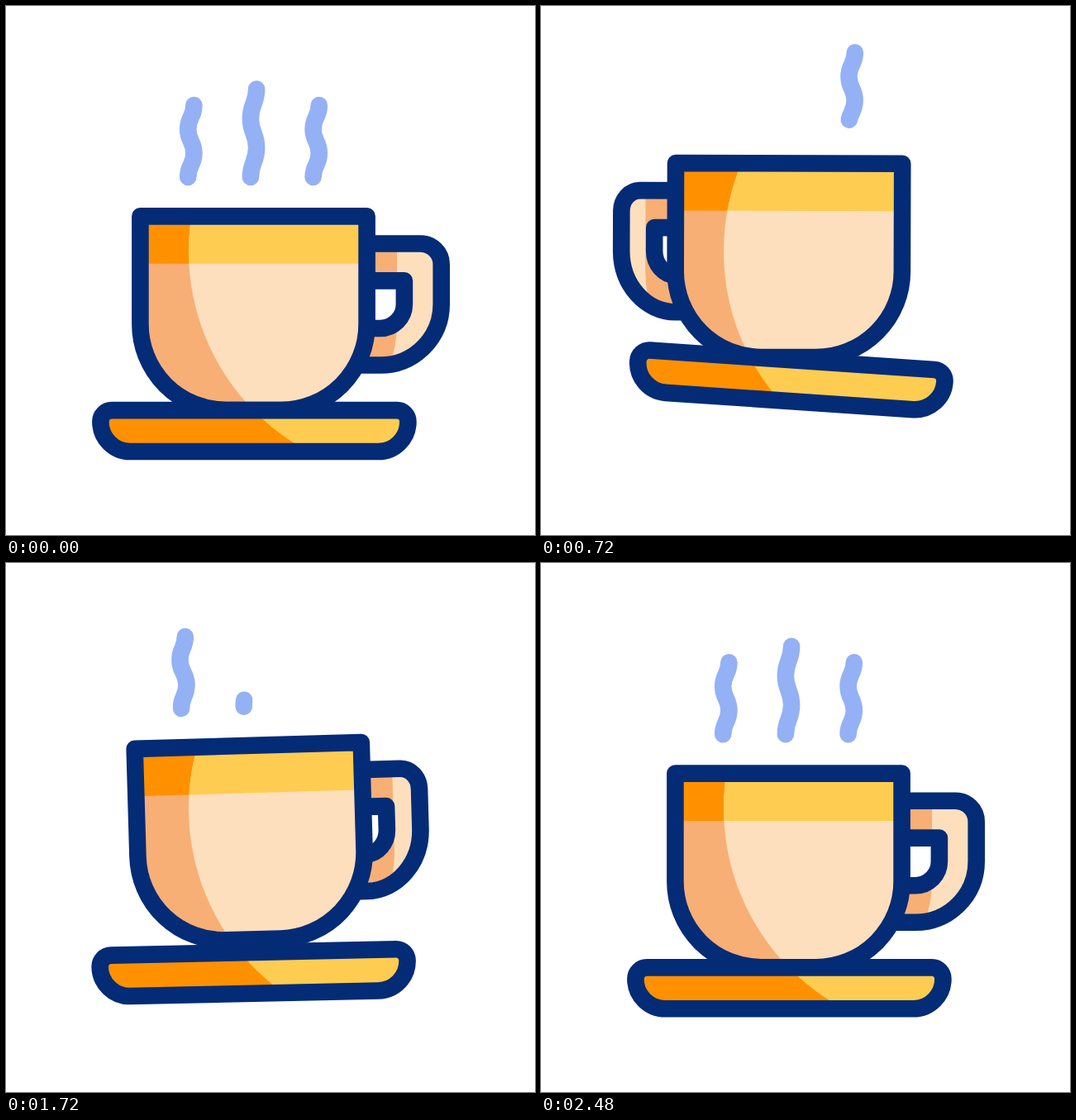
These frames come from a looping animation (640 by 640 pixels, 3.02 s). An HTML page:

```html
<!DOCTYPE html>
<html lang="en">
<head>
<meta charset="utf-8">
<title>Coffee cup</title>
<style>
  html, body { margin: 0; width: 100%; height: 100%; overflow: hidden; background: #fff; }
  svg { display: block; width: 100vw; height: 100vh; }
  .line { fill: none; stroke: #042b76; stroke-width: 20.6; stroke-linejoin: round; stroke-linecap: round; }
  .steam { fill: none; stroke: #94b1f5; stroke-width: 20.6; stroke-linecap: round; }
  .spark { stroke: #fecc51; stroke-width: 20.6; stroke-linecap: round; }
  .peach { fill: #fddfbd; }
  .tan { fill: #f7af75; }
  .gold { fill: #fecc51; }
  .amber { fill: #ff9100; }
</style>
</head>
<body>
<svg viewBox="0 0 640 640">
  <defs>
    <path id="bowl" d="M162.4 254.6H436.6V385A104 104 0 0 1 332.6 489.2H266.4A104 104 0 0 1 162.4 385Z"/>
    <path id="coffee" d="M162.4 254.6H436.6V312H162.4Z"/>
    <path id="plate" d="M128 489.4H473A13.5 13.7 0 0 1 486.4 503.3A36 36 0 0 1 450.5 539.3H150.3A36 36 0 0 1 114.4 503.3A13.5 13.7 0 0 1 128 489.4Z"/>
    <clipPath id="light"><circle cx="495.5" cy="297" r="274.5"/></clipPath>
    <clipPath id="grip"><path class="ear" clip-rule="evenodd"/></clipPath>
  </defs>

  <g class="cup">
    <path class="ear peach" fill-rule="evenodd"/>
    <g clip-path="url(#grip)">
      <use href="#bowl" fill="#f7af75" stroke="#f7af75" stroke-width="72.8"/>
    </g>
    <path class="ear line"/>
    <use href="#bowl" class="tan"/>
    <use href="#coffee" class="amber"/>
  </g>
  <g clip-path="url(#light)">
    <g class="cup">
      <use href="#bowl" class="peach"/>
      <use href="#coffee" class="gold"/>
    </g>
  </g>
  <g class="cup">
    <use href="#bowl" class="line"/>
    <g id="steams"></g>
  </g>

  <g class="saucer"><use href="#plate" class="amber"/></g>
  <g clip-path="url(#light)">
    <g class="saucer"><use href="#plate" class="gold"/></g>
  </g>
  <g class="saucer"><use href="#plate" class="line"/></g>
  <g id="sparks"></g>
</svg>
<script>
const LOOP = 3020;
const CX = 299.5;
const smooth = x => x * x * (3 - 2 * x);
const rise = x => 1 - (1 - x) ** 3;
const fall = x => x * x;
const ramp = (t, start, span) => smooth(Math.min(1, Math.max(0, (t - start) / span)));
const all = sel => [...document.querySelectorAll(sel)];

function add(parent, tag, attrs) {
  const el = document.createElementNS("http://www.w3.org/2000/svg", tag);
  for (const k in attrs) el.setAttribute(k, attrs[k]);
  return document.querySelector(parent).appendChild(el);
}

// keys: [time, value, easing towards this key]
function track(keys, t) {
  for (let i = 1; i < keys.length; i++) {
    const [t0, v0] = keys[i - 1], [t1, v1, ease = smooth] = keys[i];
    if (t < t1) return v0 + (v1 - v0) * ease((t - t0) / (t1 - t0));
  }
  return keys[keys.length - 1][1];
}

const cupY = [[0, 0], [780, -64.2, rise], [1268, 0, fall], [1645, -36, rise],
  [1950, 0, fall], [2170, -23, rise], [2480, 0, fall]];
const cupTurn = [[0, 0], [420, -4.1], [1000, 3.95], [1640, -1.75], [2300, 0.5], [2480, 0]];
const saucerY = [[0, 0], [607, -64, rise], [1159, 0, fall], [1470, -36, rise],
  [1830, 0, fall], [2100, -22, rise], [2330, 0, fall]];
const saucerTurn = [[0, 0], [350, -6.3], [760, 4.15], [1520, -1.8], [2320, 1.75], [2480, 0]];
const earSwing = [[0, 1], [800, -0.945], [1480, 1], [1980, 0.8], [2480, 1]];

// Handle outline squeezed horizontally about the cup's axis
function earPath(s) {
  const p = (x, y) => `${(CX + x * s).toFixed(2)} ${y}`;
  const k = 0.5523;
  const bend = (x0, y0, x1, y1) =>
    `C${p(x0 + (x1 > x0 ? k * (x1 - x0) : 0), y0 + (x1 > x0 ? 0 : k * (y1 - y0)))} ` +
    `${p(x1 + (x1 > x0 ? 0 : (1 - 1) + k * (x0 - x1)), y1 - (x1 > x0 ? k * (y1 - y0) : 0))} ${p(x1, y1)}`;
  return `M${p(0, 287.8)}L${p(202.2, 287.8)}${bend(202.2, 287.8, 227.2, 312.8)}` +
    `L${p(227.2, 361)}${bend(227.2, 361, 153.5, 434.8)}L${p(0, 434.8)}Z` +
    `M${p(0, 332.6)}L${p(182.4, 332.6)}L${p(182.4, 361)}` +
    `${bend(182.4, 361, 153.2, 390.2)}L${p(0, 390.2)}Z`;
}

function steamPath(x, top) {
  const h = (207.3 - top) / 3, m = h / 2;
  return `M${x} 207.3c0 ${-m} 7.2 ${-m} 7.2 ${-h}s-7.2 ${-m} -7.2 ${-h}s7.2 ${-m} 7.2 ${-h}`;
}

// times: vanish, grow, vanish, grow
const steams = [
  { x: 220.2, top: 120.2, times: [232, 760, 1039, 1480] },
  { x: 295.9, top: 100.8, times: [455, 960, 1227, 1680] },
  { x: 371.6, top: 120.2, times: [683, 1170, 1455, 1874] }
];
for (const s of steams)
  s.el = add("#steams", "path", { class: "steam", d: steamPath(s.x, s.top), pathLength: 1 });

const sparks = [
  { x: 527.7, y: 532.5, dx: 41.3, dy: 0, at: 1085 },
  { x: 528.5, y: 498.5, dx: 36.2, dy: -20.5, at: 1085 },
  { x: 74.2, y: 532.5, dx: -41.3, dy: 0, at: 1815 },
  { x: 73, y: 498.5, dx: -36.2, dy: -20.5, at: 1815 }
];
for (const s of sparks) s.el = add("#sparks", "line", { class: "spark" });

const show = (el, on) => el.setAttribute("visibility", on ? "visible" : "hidden");

function drawSteam({ el, times }, t) {
  const next = times.findIndex(v => t < v);
  const i = next < 0 ? 3 : next - 1;
  const p = i < 0 ? 0 : ramp(t, times[i], 250);
  const growing = i % 2 === 1;
  const from = growing ? 0 : p, len = growing ? p : 1 - p;
  show(el, len > 0.004);
  el.setAttribute("stroke-dasharray", len >= 1 ? "none" : `${len} 3`);
  el.setAttribute("stroke-dashoffset", -from);
}

function drawSpark({ el, x, y, dx, dy, at }, t) {
  const head = ramp(t, at, 500), tail = ramp(t, at + 202, 450);
  show(el, head - tail > 0.004);
  el.setAttribute("x1", x + dx * tail);
  el.setAttribute("y1", y + dy * tail);
  el.setAttribute("x2", x + dx * head);
  el.setAttribute("y2", y + dy * head);
}

const cups = all(".cup"), saucers = all(".saucer"), ears = all(".ear");

function place(els, y, turn, px, py) {
  for (const el of els)
    el.setAttribute("transform", `translate(0 ${y}) rotate(${turn} ${px} ${py})`);
}

function draw(t) {
  place(cups, track(cupY, t), track(cupTurn, t), CX, 489);
  place(saucers, track(saucerY, t), track(saucerTurn, t), 300.4, 540);
  const d = earPath(track(earSwing, t));
  for (const el of ears) el.setAttribute("d", d);
  for (const s of steams) drawSteam(s, t);
  for (const s of sparks) drawSpark(s, t);
}

const begin = performance.now();
function tick() {
  draw((performance.now() - begin) % LOOP);
  requestAnimationFrame(tick);
}
draw(0);
requestAnimationFrame(tick);
</script>
</body>
</html>
```
